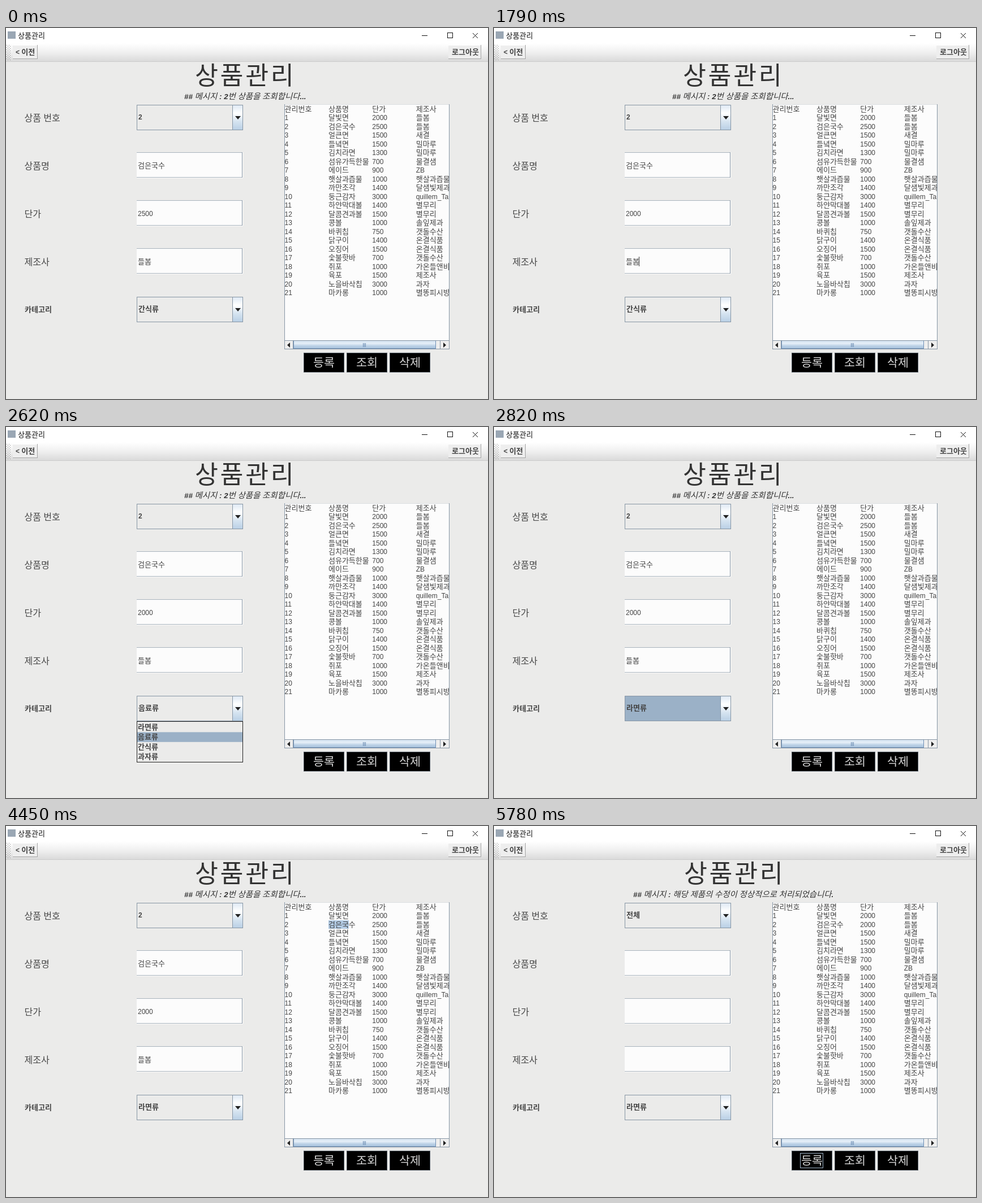
Write an HTML page with a canvas that moves like this. It is 852 px wide and 657 px high and loops after 6.59 s.

```html
<!DOCTYPE html>
<html lang="ko">
<head>
<meta charset="utf-8">
<title>상품관리</title>
<style>
html, body { margin: 0; width: 100%; height: 100%; overflow: hidden; background: #ebebea; }
canvas { display: block; }
</style>
</head>
<body>
<canvas id="stage" width="852" height="657"></canvas>
<script>
const ctx = document.getElementById('stage').getContext('2d');
const LOOP = 6590;
const KO = '"Noto Sans CJK KR", "Noto Sans CJK", sans-serif';
const EN = '"Liberation Sans", Arial, sans-serif';
const INK = '#444', EDGE = '#8796a5', SKY = '#b8cfe5', FOCUS = '#9bb1c7';
const PANEL = '#ebebea', PAPER = '#fcfcfc';

const rows = `관리번호|상품명|단가|제조사
1|달빛면|2000|들봄
2|검은국수|2500|들봄
3|얼큰면|1500|새결
4|들녘면|1500|밀마루
5|김치라면|1300|밀마루
6|섬유가득한물|700|물결샘
7|에이드|900|ZB
8|햇살과즙물|1000|햇살과즙물
9|까만조각|1400|달샘빛제과
10|둥근감자|3000|quillem_Ta
11|하얀막대볼|1400|별무리
12|달콤견과볼|1500|별무리
13|콩볼|1000|솔잎제과
14|바퀴칩|750|갯돌수산
15|닭구이|1400|온결식품
16|오징어|1500|온결식품
17|숯불핫바|700|갯돌수산
18|쥐포|1000|가온들앤비
19|육포|1500|제조사
20|노을바삭칩|3000|과자
21|마카롱|1000|별똥피시방`.split('\n').map(line => line.split('|'));
const kinds = ['라면류', '음료류', '간식류', '과자류'];
const stops = [570, 582, 594, 606, 618, 647, 654, 660, 667, 674, 725, 737];

function fill(x, y, w, h, color) {
  ctx.fillStyle = color;
  ctx.fillRect(x, y, w, h);
}

function frame(x, y, w, h, color) {
  ctx.strokeStyle = color;
  ctx.lineWidth = 1;
  ctx.strokeRect(x + .5, y + .5, w - 1, h - 1);
}

function shade(y0, y1, ...colors) {
  const g = ctx.createLinearGradient(0, y0, 0, y1);
  colors.forEach((c, i) => g.addColorStop(i / (colors.length - 1), c));
  return g;
}

function poly(color, ...points) {
  ctx.fillStyle = color;
  ctx.beginPath();
  points.forEach(([x, y]) => ctx.lineTo(x, y));
  ctx.fill();
}

function line(color, x0, y0, x1, y1) {
  ctx.strokeStyle = color;
  ctx.lineWidth = 1;
  ctx.beginPath();
  ctx.moveTo(x0, y0);
  ctx.lineTo(x1, y1);
  ctx.stroke();
}

// size is the advance of one Hangul syllable; Latin runs use it as font size
function text(s, x, y, size, { style = '', latin = style, color = INK, gap = 0 } = {}) {
  ctx.fillStyle = color;
  ctx.letterSpacing = gap + 'px';
  for (const run of s.split(/([가-힣]+)/)) {
    if (!run) continue;
    const hangul = /[가-힣]/.test(run);
    ctx.font = hangul ? `${style} ${size / .92}px ${KO}` : `${latin} ${size}px ${EN}`;
    ctx.fillText(run, x, y);
    x += ctx.measureText(run).width;
  }
}

function combo(y, value, focused) {
  fill(231, y, 188, 45, focused ? FOCUS : PANEL);
  fill(400, y, 19, 45, shade(y, y + 45, '#dde8f3', '#ffffff', '#d5e3f0', SKY));
  frame(231, y, 188, 45, EDGE);
  fill(400, y, 1, 45, EDGE);
  poly('#222', [405, y + 20], [415, y + 20], [410, y + 26]);
  text(value, 234, y + 26, 12, { style: 'bold' });
}

function field(y, value) {
  fill(231, y, 188, 46, PAPER);
  fill(231, y, 187, 1, '#a9b3bd');
  fill(231, y + 44, 187, 1, '#a9b3bd');
  fill(417, y, 1, 45, EDGE);
  text(value, 233, y + 28, 12);
}

function blackButton(x, w, label, hover, focused) {
  fill(x, 575, w, 35, '#000');
  if (hover) {
    [SKY, EDGE, SKY].forEach((c, i) => frame(x + i, 575 + i, w - 2 * i, 35 - 2 * i, c));
  } else {
    frame(x, 575, w, 35, '#4f5861');
  }
  if (focused) frame(x + 15, 579, 41, 27, '#a3b8cc');
  text(label, x + 17, 600, 19, { style: '300', color: '#d8d8d8' });
}

function windowBar() {
  fill(0, 0, 852, 27, '#fff');
  fill(3, 6, 14, 13, '#9aa7b4');
  text('상품관리', 21, 18, 12, { color: '#111' });
  fill(735, 13, 10, 1, '#111');
  frame(780, 8, 10, 10, '#111');
  line('#111', 825, 9, 834, 18);
  line('#111', 834, 9, 825, 18);
}

function toolBar() {
  fill(0, 27, 852, 32, shade(27, 59, '#ffffff', '#f0f0f0', '#dadada'));
  fill(0, 59, 852, 1, '#cccccc');
  for (let y = 30; y < 57; y += 2)
    for (let x = y % 4 ? 1 : 3; x < 8; x += 4) fill(x, y, 1, 1, '#888');
  for (const [x, w] of [[12, 44], [782, 58]]) {
    fill(x, 30, w, 25, '#eeeeee');
    line('#fff', x, 30.5, x + w, 30.5);
    line('#a4a4a4', x, 54.5, x + w, 54.5);
    line('#a4a4a4', x + w - .5, 30, x + w - .5, 55);
  }
  text('< 이전', 17, 47, 12, { style: 'bold' });
  text('로그아웃', 788, 47, 12, { style: 'bold' });
}

function table(selectEnd, price) {
  fill(492, 135, 292, 434, PAPER);
  if (selectEnd > 570) fill(570, 167, selectEnd - 570, 15, '#b1c9e2');
  ctx.save();
  ctx.beginPath();
  ctx.rect(492, 135, 291, 418);
  ctx.clip();
  rows.forEach((row, i) => row.forEach((cell, j) =>
    text(i == 2 && j == 2 ? price : cell, 492.5 + 77.4 * j, 148 + 15.48 * i, 12)));
  ctx.restore();

  fill(492, 553, 292, 15, '#eeeeee');
  fill(508, 554, 252, 14, shade(554, 568, '#d3e2f0', '#e6eff8', SKY, '#a9c3dd'));
  frame(508, 553, 252, 15, '#6f8fb5');
  for (const x of [631, 633, 635]) fill(x, 558, 1, 7, '#6f8fb5');
  fill(507, 553, 1, 15, EDGE);
  fill(767, 553, 1, 15, EDGE);
  poly('#222', [502, 557], [502, 566], [497, 561.5]);
  poly('#222', [773, 557], [773, 566], [778, 561.5]);
  fill(492, 553, 292, 1, EDGE);
  frame(492, 135, 292, 434, EDGE);
  fill(493, 135, 290, 1, '#dcdfe2');
}

function popup(active) {
  fill(231, 521, 188, 73, PANEL);
  fill(232, 523 + 17.4 * active, 186, 17.4, FOCUS);
  kinds.forEach((kind, i) => text(kind, 233, 536 + 17.4 * i, 12, { style: 'bold' }));
  frame(231, 521, 188, 73, '#222');
}

function selection(t) {
  if (t < 4380 || t >= 5540) return 0;
  if (t >= 4990) return 748;
  const p = Math.min(1, (t - 4380) / 500);
  const mouse = 570 + 170 * p * (2 - p);
  return stops.filter(x => x <= mouse).pop();
}

function draw(t) {
  const within = (a, b) => t >= a && t < b;
  const done = t >= 5540;
  const kind = t < 2560 ? 2 : t < 2690 ? 1 : 0;
  const price = t < 920 ? '2500' : t < 1050 ? '200' : '2000';

  fill(0, 0, 852, 657, PANEL);
  windowBar();
  toolBar();

  text('상품관리', done ? 336 : 334, 99.5, 41, { gap: 3.6, color: '#333' });
  const notice = { style: 'italic', latin: 'italic bold', color: '#333' };
  if (done) text('## 메시지 : 해당 제품의 수정이 정상적으로 처리되었습니다.', 246, 126, 13.3, notice);
  else text('## 메시지 : 2번 상품을 조회합니다...', 315, 126, 13.3, notice);

  ['상품 번호', '상품명', '단가', '제조사'].forEach((s, i) =>
    text(s, 32.5, 165 + 85 * i, 14.8, { style: '300', color: '#484848' }));
  text('카테고리', 33, 503, 12, { style: 'bold' });

  combo(136, done ? '전체' : '2');
  field(220, done ? '' : '검은국수');
  field(305, done ? '' : price);
  field(390, done ? '' : '들봄');
  combo(476, kinds[kind], within(2820, 4380));

  if (within(250, 470)) fill(245, 235, 1, 16, '#333');
  if (within(580, 1340)) fill(within(920, 1050) ? 240 : 246, 320, 1, 16, '#333');
  if (within(1340, 1520) || within(1790, 2040)) fill(256, 405, 1, 17, '#333');

  table(selection(t), done ? '2000' : '2500');
  blackButton(526, 72, '등록', within(3270, 3770) || within(5330, 5780), done);
  blackButton(602, 72, '조회');
  blackButton(678, 72, '삭제');
  if (within(2280, 2820)) popup(kind);
}

function tick() {
  draw(performance.now() % LOOP);
  requestAnimationFrame(tick);
}
tick();
</script>
</body>
</html>
```
